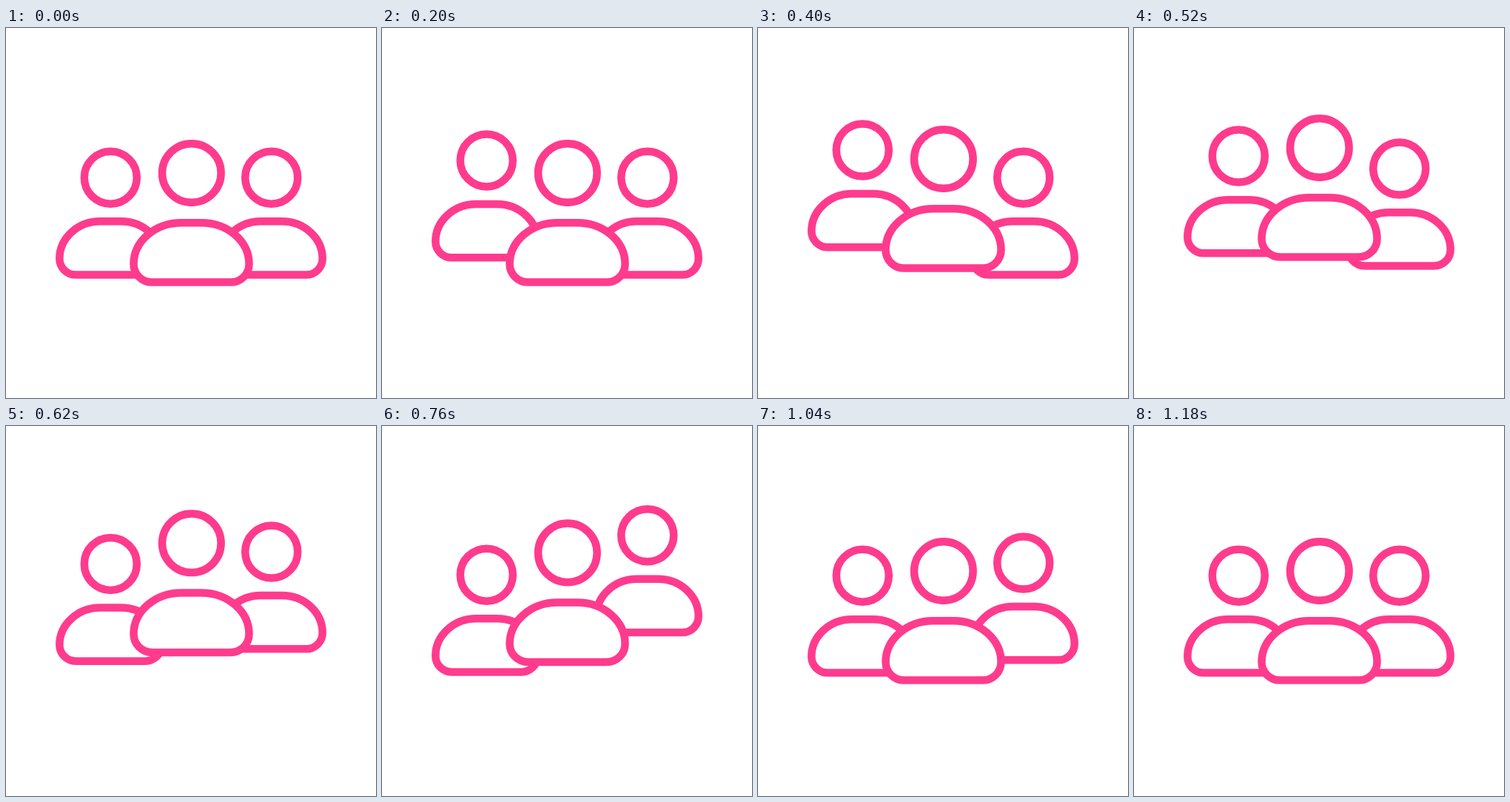
Recreate the animation shown at these times as an HTML page. Size 500 by 500 pixels, loop 1400 ms.

```html
<!DOCTYPE html>
<html lang="en">
<head>
<meta charset="utf-8">
<title>Group</title>
<style>
  html, body { margin: 0; width: 100%; height: 100%; overflow: hidden; background: #fff; }
  svg { display: block; width: 100%; height: 100%; }
</style>
</head>
<body>
<svg viewBox="0 0 500 500" fill="#fff" stroke="#ff3b8d" stroke-width="10.5">
  <defs>
    <g id="side">
      <circle cy="202.2" r="35.5"/>
      <path d="M-14 261.3H14A55 50.5 0 0 1 69 311.8A22 21.7 0 0 1 47 333.5H-47A22 21.7 0 0 1 -69 311.8A55 50.5 0 0 1 -14 261.3Z"/>
    </g>
  </defs>
  <g id="left"><use href="#side" x="141.3"/></g>
  <g id="right"><use href="#side" x="358.7"/></g>
  <g id="middle">
    <circle cx="250.8" cy="196" r="39.8"/>
    <path d="M237 263.2H264A64.5 55.8 0 0 1 328.5 319A25 24.6 0 0 1 303.5 343.6H197.5A25 24.6 0 0 1 172.5 319A64.5 55.8 0 0 1 237 263.2Z"/>
  </g>
</svg>
<script>
  const LOOP = 1400, STEP = 20;
  const smooth = u => u * u * (3 - 2 * u);
  const easeOut = u => u + u * u - u * u * u;
  const progress = (t, from, to) => Math.min(1, Math.max(0, (t - from) / (to - from)));

  const people = [
    { id: 'left', start: 0, peak: 400, end: 800, height: 37.2, rise: easeOut },
    { id: 'middle', start: 200, peak: 600, end: 1000, height: 38, rise: smooth },
    { id: 'right', start: 400, peak: 800, end: 1180, height: 56, rise: smooth }
  ];

  function draw(now) {
    const t = Math.floor(now % LOOP / STEP) * STEP;
    for (const { id, start, peak, end, height, rise } of people) {
      const lift = height * (rise(progress(t, start, peak)) - smooth(progress(t, peak, end)));
      document.getElementById(id).setAttribute('transform', `translate(0 ${-lift})`);
    }
  }

  const origin = performance.now();
  function tick() {
    draw(performance.now() - origin);
    requestAnimationFrame(tick);
  }
  tick();
</script>
</body>
</html>
```
